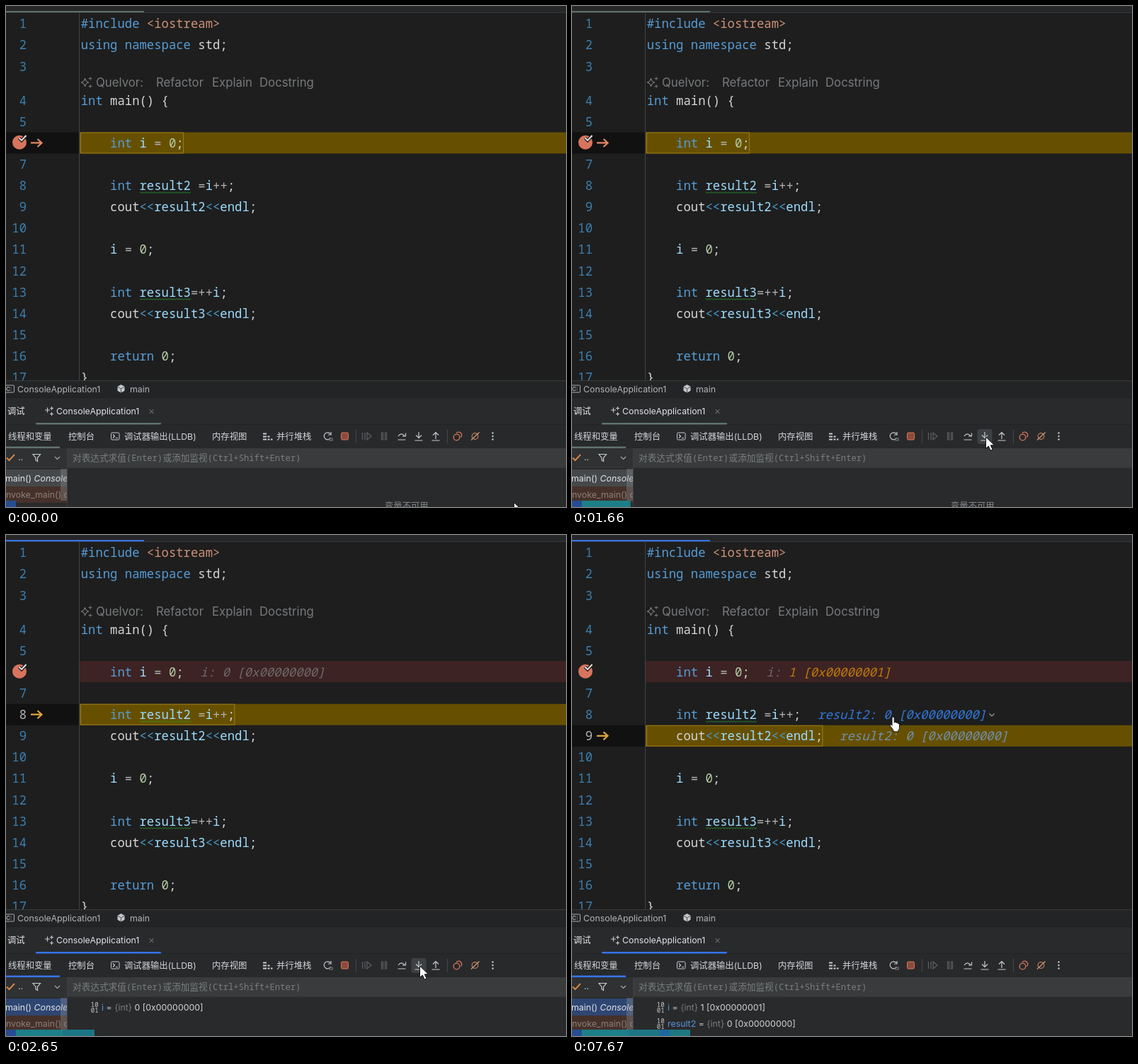
Write an HTML page that moves like this. It is 791 px wide and 708 px high and loops after 8000 ms.

```html
<!DOCTYPE html>
<html lang="zh">
<head>
<meta charset="utf-8">
<style>
html, body { margin: 0; width: 100%; height: 100%; overflow: hidden; background: #1e1e1e; }
svg { display: block; width: 791px; height: 708px; }
text { white-space: pre; }
.code { font: 17.25px "Noto Sans Mono", "DejaVu Sans Mono", monospace; }
.hint { font-style: italic; }
.ui { font: 12.35px Inter, "Noto Sans CJK SC", "Noto Sans CJK", sans-serif; }
.lens { font: 16.8px Inter, sans-serif; }
.field { font: 12.2px "Noto Sans Mono", "Noto Sans CJK SC", "Noto Sans CJK", monospace; }
.wide { font-size: 12.65px; }
.bits { font-size: 9px; font-weight: 500; }
</style>
</head>
<body>
<svg id="stage" viewBox="0 0 791 708"></svg>
<script>
const LOOP = 8000;
const CH = 10.35;
const LEFT = 105.7;
const C = {
  key: '#569cd6', id: '#9cdcfe', txt: '#d6d6d6', num: '#b5cea8', str: '#ce9178',
  op: '#4a9acb', dim: '#b4b4b4', ui: '#d3d5d9', grey: '#797d83', off: '#5d6064'
};

// time, progress, cursor x, cursor y, current line, hovered button
const STEPS = [
  [0, 14, 717.5, 701.5, 6, ''],
  [330, 27, 537, 586, 6, ''],
  [660, 41, 531, 598, 6, ''],
  [990, 56, 562, 605, 6, 'over'],
  [1320, 70, 596, 618, 6, 'out'],
  [1660, 83, 584.5, 609, 6, 'into'],
  [1990, 97, 584.5, 609, 6, 'into', 'click'],
  [2320, 111, 584.5, 609, 8, '', 'busy'],
  [2650, 125, 584.5, 609, 8, 'into'],
  [6670, 138, 584.5, 609, 9, 'into'],
  [7340, 153, 546, 509, 9, ''],
  [7670, 167, 455, 257.5, 9, '', 'hand']
];

// each line: indent, then pairs of colour and text
const CODE = {
  1: [0, 'key', '#include ', 'str', '<iostream>'],
  2: [0, 'key', 'using namespace ', 'txt', 'std;'],
  4: [0, 'key', 'int ', 'txt', 'main() {'],
  6: [4, 'key', 'int ', 'id', 'i ', 'dim', '= ', 'num', '0', 'txt', ';'],
  8: [4, 'key', 'int ', 'id', 'result2 ', 'dim', '=', 'id', 'i', 'dim', '++', 'txt', ';'],
  9: [4, 'txt', 'cout', 'op', '<<', 'id', 'result2', 'op', '<<', 'id', 'endl', 'txt', ';'],
  11: [4, 'id', 'i ', 'dim', '= ', 'num', '0', 'txt', ';'],
  13: [4, 'key', 'int ', 'id', 'result3', 'dim', '=++', 'id', 'i', 'txt', ';'],
  14: [4, 'txt', 'cout', 'op', '<<', 'id', 'result3', 'op', '<<', 'id', 'endl', 'txt', ';'],
  16: [4, 'key', 'return ', 'num', '0', 'txt', ';'],
  17: [0, 'txt', '}']
};

const esc = s => s.replace(/&/g, '&amp;').replace(/</g, '&lt;');
const rowY = n => n < 4 ? 25 + (n - 1) * 30.1 : 133.2 + (n - 4) * 30.13;
const rect = (x, y, w, h, fill, more = '') =>
  `<rect x="${x}" y="${y}" width="${w}" height="${h}" fill="${fill}" ${more}/>`;
const text = (cls, x, y, fill, s, more = '') =>
  `<text class="${cls}" x="${x}" y="${y}" fill="${fill}" ${more}>${s}</text>`;
const ui = (x, y, s, fill = C.ui) => text('ui', x, y, fill, s);
const line = (d, stroke, w = 1.2) => `<path d="${d}" fill="none" stroke="${stroke}" stroke-width="${w}"/>`;
const shape = (d, fill, more = '') => `<path d="${d}" fill="${fill}" ${more}/>`;
const dot = (x, y, r, fill, more = '') => `<circle cx="${x}" cy="${y}" r="${r}" fill="${fill}" ${more}/>`;
const span = (fill, s) => `<tspan fill="${fill}">${esc(s)}</tspan>`;

function codeLine(n) {
  const [indent, ...parts] = CODE[n];
  let s = '';
  for (let k = 0; k < parts.length; k += 2) s += span(C[parts[k]], parts[k + 1]);
  return text('code', LEFT + indent * CH, rowY(n) + 6.3, C.txt, s);
}

function lineLength(n) {
  const [indent, ...parts] = CODE[n];
  return indent + parts.filter((p, k) => k % 2).join('').length;
}

function squiggle(n) {
  const y = rowY(n) + 9;
  let d = `M189 ${y}`;
  for (let x = 191, k = 0; x <= 261; x += 2, k++) d += `L${x} ${y + (k % 2 ? 0 : 2)}`;
  return line(d, '#2b9a2f', 0.9);
}

const hint = (n, s, fill) =>
  text('code hint', LEFT + lineLength(n) * CH + 24, rowY(n) + 6.3, fill, s);

function editor(cur, hand) {
  const y = rowY(cur);
  let s = rect(0, 0, 791, 530, '#1e1e1e') + rect(0, 0, 791, 9, '#262728') + rect(0, 9, 791, 1, '#343638');
  s += rect(0, 7, 195, 2, cur > 6 ? '#3574f0' : '#5e716a');
  if (cur > 6) s += rect(104, 178, 687, 30, '#3d2323');
  s += rect(0, y - 15, 103, 30, '#111111') + rect(104, y - 15, 687, 30, '#665000');
  s += rect(105.5, y - 14.5, lineLength(cur) * CH, 29, '#665000', 'stroke="#a07d16"');
  s += rect(103, 10, 1, 519, '#414345');

  for (let n = 1; n <= 17; n++) {
    if (n !== 6) s += text('code', 29, rowY(n) + 6.3, n === cur ? '#b5b5b5' : '#3c7fb0', n, 'text-anchor="end"');
    if (CODE[n]) s += codeLine(n);
  }
  s += squiggle(8) + squiggle(13);

  const lens = '#77797c';
  s += line('M111.500 102q.8 5 5.500 6q-4.700 1-5.500 6q-.8-5-5.500-6q4.700-1 5.500-6z', lens);
  s += line('M119 100v5M116.500 102.500h5M119 111v5M116.500 113.500h5', lens, 1);
  [[127, 'Quelvor:'], [212, 'Refactor'], [291, 'Explain'], [358, 'Docstring']]
    .forEach(([x, w]) => s += text('lens', x, 114, lens, w));

  const check = 'M18.500 186.500l3.500 3.500l6.500-7';
  s += dot(19, 192.8, 10, '#d8745d') + line(check, '#1e1e1e', 4.5) + line(check, '#e4e4e4', 1.9);
  s += line(`M35 ${y}h15M44.500 ${y - 5.5}l6 5.500l-6 5.500`, cur === 6 ? '#e38864' : '#dfa33f', 2.2);

  if (cur === 8) s += hint(6, 'i: 0 [0x00000000]', '#71686a');
  if (cur === 9) {
    s += hint(6, span('#71686a', 'i: ') + span('#be7b0d', '1 [0x00000001]'), '#be7b0d');
    s += hint(8, 'result2: 0 [0x00000000]', hand ? '#3279dc' : '#696b6e');
    s += hint(9, 'result2: 0 [0x00000000]', '#7090ac');
    if (hand) s += line('M589.500 252.500l3.500 3.500l3.500-3.500', '#9da0a5');
  }
  return s;
}

function header() {
  let s = rect(0, 529, 791, 25, '#232425') + rect(0, 529, 791, 1, '#393b3d');
  s += rect(0, 553, 791, 39, '#292a2c') + rect(0, 553, 791, 1, '#202122');
  s += rect(-2, 536, 13.5, 10, 'none', 'stroke="#a9adb3" rx="1"');
  s += text('ui', 0, 544, '#a9adb3', 'C:', 'style="font-size:8px;font-weight:600"');
  s += ui(16, 546, 'ConsoleApplication1', '#b0b3b8') + ui(175, 546, 'main', '#b0b3b8');
  s += shape('M162.500 535l5 2.800v6l-5 2.800l-5-2.800v-6z', '#c4c7cb');
  s += line('M157.500 538l5 3l5-3M162.500 541v5.500', '#4b4e51', 1);
  s += ui(2, 577, '调试', '#e4e5e8') + ui(71, 577, 'ConsoleApplication1', '#e0e2e6');
  s += line('M55 571h7M58.500 567.500v7M64.500 566v5M62 568.500h5M64.500 574v5M62 576.500h5', '#c5c8cc');
  return s + line('M202.500 570l6 6M208.500 570l-6 6', '#85898e', 1);
}

const stepInto = color => line('M583 602v8M579 606.500l4 4l4-4M577.500 614h11', color);

function toolbar(accent, hover, busy) {
  let s = rect(0, 591.5, 791, 34, '#28292b') + rect(0, 591, 791, 1, '#222324');
  s += rect(42, 589, 177, 2.5, accent, 'rx="1"');
  [[3, '线程和变量'], [88, '控制台'], [167, '调试器输出(LLDB)'], [291, '内存视图'], [382, '并行堆栈']]
    .forEach(([x, w]) => s += ui(x, 612.5, w));
  s += rect(0, 622.5, 76, 2.5, accent);

  const on = '#c8cbd0', step = busy ? C.off : on;
  const spot = { over: 559, into: 583, out: 607 }[hover];
  if (spot) s += rect(spot - 10.5, 598, 21, 21, '#3e4144', 'rx="3"');
  s += rect(148.5, 603, 11.5, 10, 'none', `stroke="${on}" rx="1.5"`);
  s += line('M151 605.500l2.500 2.500l-2.500 2.500M155 610.500h3', on);
  s += line('M363 604.500h5M363 608.500h5M363 612.500h5M369.500 608.500h3M369.500 612.500h3M374 612.500h2.500', on, 2);
  s += line('M458 604.500a5 5 0 1 0 .5 6M459 602v4h-4', on) + line('M457 611h4v3h-4z', C.grey);
  s += rect(473.5, 603, 10, 10, '#8c4a3d', 'stroke="#d8785f" rx="1.5"');
  s += rect(494, 599, 1, 19, '#44474a') + rect(623, 599, 1, 19, '#44474a');
  s += line('M503.500 603v10M507 603v10M510 603l6 5l-6 5z', C.off);
  s += line('M530.500 603h2v10h-2zM535.500 603h2v10h-2z', busy ? on : C.off);
  s += line('M554 608q4-6 9-.5M564.500 603.500v4.500h-4.500M553.500 613h11', step) + stepInto(step);
  s += line('M607 612v-9M603 606.500l4-4l4 4M601.500 614h11', step);
  s += dot(636.5, 609.5, 4.3, 'none', 'stroke="#d8785f" stroke-width="1.3"');
  s += line('M636 603.500a4.300 4.300 0 1 1 6.500 6', '#d8785f', 1.3);
  s += dot(662.5, 608, 4.3, 'none', 'stroke="#c47c55" stroke-width="1.2"') + line('M657 613.500l11.500-11', '#c9a07f');
  return s + [603.5, 608, 612.5].map(y => dot(687.5, y, 1.2, on)).join('');
}

function variable(y, name, value) {
  const bits = (dy, w) => text('field bits', 119.8, y + dy, '#c5c8cc', w);
  return bits(-5.5, '10') + bits(2.8, '01') +
    ui(135, y, span('#5a94dc', name) + span('#b5b8bd', ' = ') + span(C.grey, '{int} ') + span('#d3d5d9', value));
}

function panel(cur) {
  let s = rect(0, 625, 791, 83, '#292a2b') + rect(0, 625, 791, 28, '#393b3c');
  s += rect(0, 625, 86, 28, '#2f3132') + rect(0, 652, 791, 1, '#333537') + rect(86, 625, 1, 83, '#3c3e40');
  s += line('M1 638.500l3.500 3.500l7.500-8', '#d18645', 2) + ui(17, 642, '..');
  s += line('M38 633.500h10.500l-4 5v5l-2.500-1.500v-3.500z', '#c8cbd0') + line('M69 637l3.500 3.500l3.500-3.500', '#a6a9ae');
  const grey = '#7b7e81';
  s += text('field wide', 94, 643, grey, '对表达式求值') + text('field', 170, 643, grey, '(Enter)');
  s += text('field wide', 221.5, 643, grey, '或添加监视') + text('field', 284.8, 643, grey, '(Ctrl+Shift+Enter)');

  s += '<svg width="86" height="708">' + rect(0, 655, 86, 24, cur > 6 ? '#2e4672' : '#45484a') + rect(0, 679, 86, 23, '#46312a');
  s += ui(-1, 672, 'main() <tspan font-style="italic">Console</tspan>Application1', '#e2e4e8');
  s += ui(-3, 695, 'invoke_main() crt', '#8b807a') + rect(77, 654, 9, 45, '#8d9398', 'opacity=".35"') + '</svg>';

  if (cur === 6) s += ui(535, 710.5, '变量不可用', '#85888b');
  else s += variable(672, 'i', cur === 8 ? '0 [0x00000000]' : '1 [0x00000001]');
  if (cur === 9) s += variable(695, 'result2', '0 [0x00000000]');
  return s;
}

function progress(end) {
  const bands = [[0, 14, '#264d91'], [14, 80, '#1d8088'], [80, 125, '#1c7584'], [125, 138, '#1e66a2'], [138, 167, '#1d7880']];
  return bands.filter(b => b[0] < end)
    .map(([a, b, fill]) => rect(a, 699, Math.min(b, end) - a, 9, fill)).join('');
}

function pointer(x, y, hand) {
  const d = hand
    ? 'M-3 1.500q0-2 1.600-2t1.600 2v6l.8-.6q2-.2 2.200 1q2.300-.5 2.500 1q1.800-.2 1.800 2v4q0 2.200-1.500 3.500v2h-7v-2l-4.500-6q-.8-1.800 1-2.200l1.500 1.600z'
    : 'M0 0v16.500l3.800-3.600l2.800 6.200l3-1.300l-2.800-6h5.200z';
  return shape(d, '#fff', `stroke="#111" stroke-width="1" transform="translate(${x} ${y})"`);
}

function scene([, end, x, y, cur, hover, mode]) {
  const accent = cur > 6 ? '#3574f0' : '#60736c';
  let s = editor(cur, mode === 'hand') + header() + toolbar(accent, hover, mode === 'busy') + panel(cur) + progress(end);
  if (mode === 'click') {
    s += rect(593.5, 636.5, 75, 33.5, '#303234', 'stroke="#484b4e"');
    s += ui(606, 657, '步入', '#dfe1e5') + ui(637, 657, 'F11', '#898d92');
    s += dot(584, 609.5, 11, '#b3a51c', 'opacity=".9"') + stepInto('#d9d28a');
  }
  return s + pointer(x, y, mode === 'hand');
}

const stage = document.getElementById('stage');
let shown = -1;
function draw(now) {
  const t = now % LOOP;
  let k = STEPS.length - 1;
  while (STEPS[k][0] > t) k--;
  if (k !== shown) stage.innerHTML = scene(STEPS[shown = k]);
}
function tick() {
  draw(performance.now());
  requestAnimationFrame(tick);
}
tick();
</script>
</body>
</html>
```
